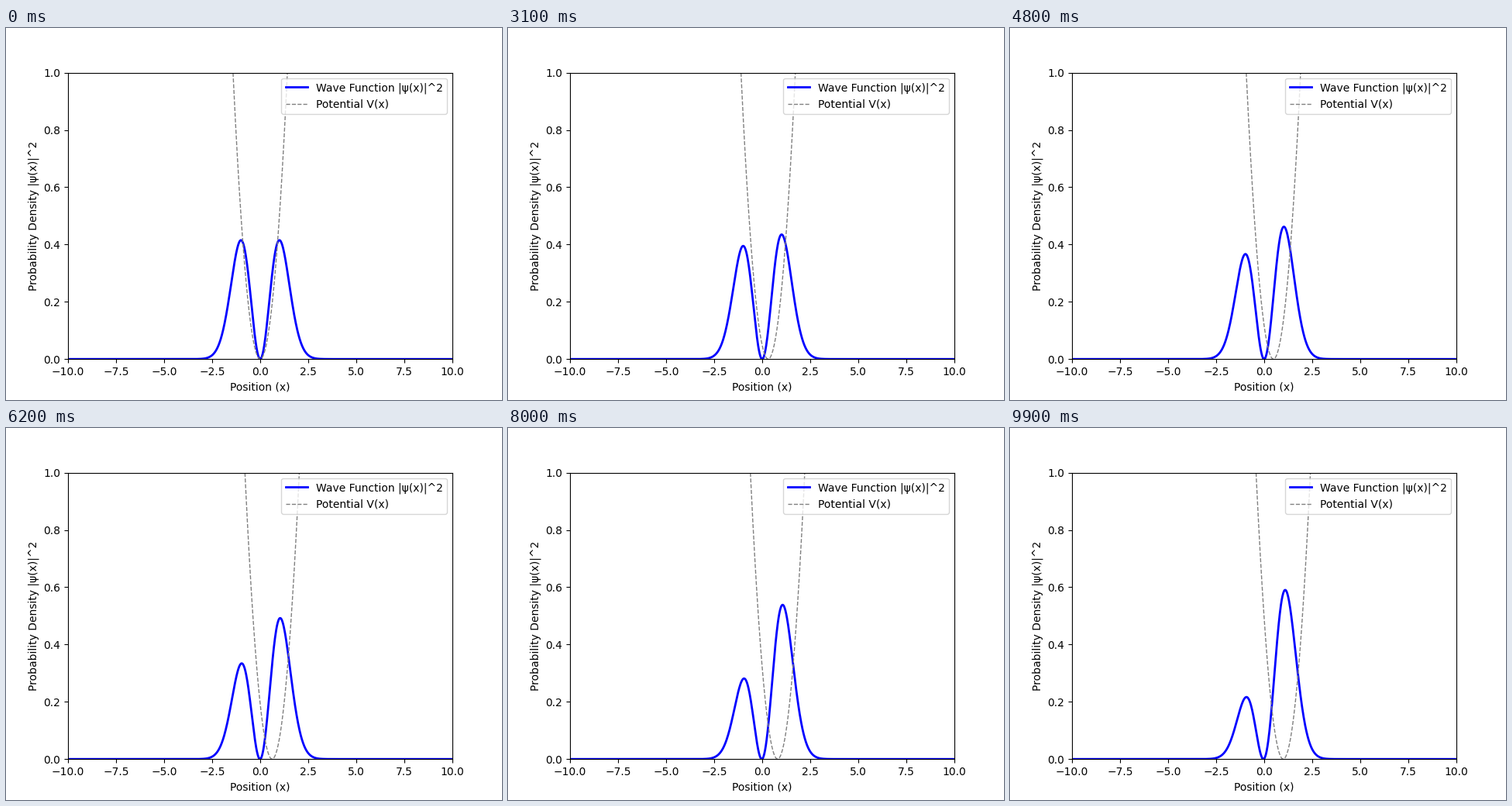
Write a matplotlib script that moves like this. It is 640 px wide and 480 px high and loops after 10000 ms.

```python
import numpy as np
import matplotlib.pyplot as plt
from matplotlib.animation import FuncAnimation

FRAMES = 100
DT = 0.005      # imaginary-time step per frame
DRIFT = 2.0     # speed of the trap centre

x = np.linspace(-10, 10, 1000)


def potential(tau):
    """Harmonic trap whose centre drifts to the right."""
    return 0.5 * (x - DRIFT * tau) ** 2


def density(tau):
    """Normalised first excited state relaxing in the drifting trap."""
    tilt = DRIFT * (np.cosh(tau) - 1)
    node = -DRIFT * (np.sinh(tau) - tau)
    y = x - node
    norm = np.sqrt(np.pi) * (0.5 + tilt ** 2)
    return y ** 2 * np.exp(-(y - tilt) ** 2) / norm


fig, ax = plt.subplots(figsize=(6.4, 4.8), dpi=100)
wave, = ax.plot(x, density(0), color="blue", lw=2,
                label="Wave Function |ψ(x)|^2")
trap, = ax.plot(x, potential(0), color="gray", ls="--", lw=1,
                label="Potential V(x)")
ax.set_xlim(-10, 10)
ax.set_ylim(0, 1)
ax.set_xlabel("Position (x)")
ax.set_ylabel("Probability Density |ψ(x)|^2")
ax.legend(loc="upper right")


def update(i):
    tau = i * DT
    wave.set_ydata(density(tau))
    trap.set_ydata(potential(tau))
    return wave, trap


anim = FuncAnimation(fig, update, frames=FRAMES, interval=100, repeat=True)
plt.show()
```
